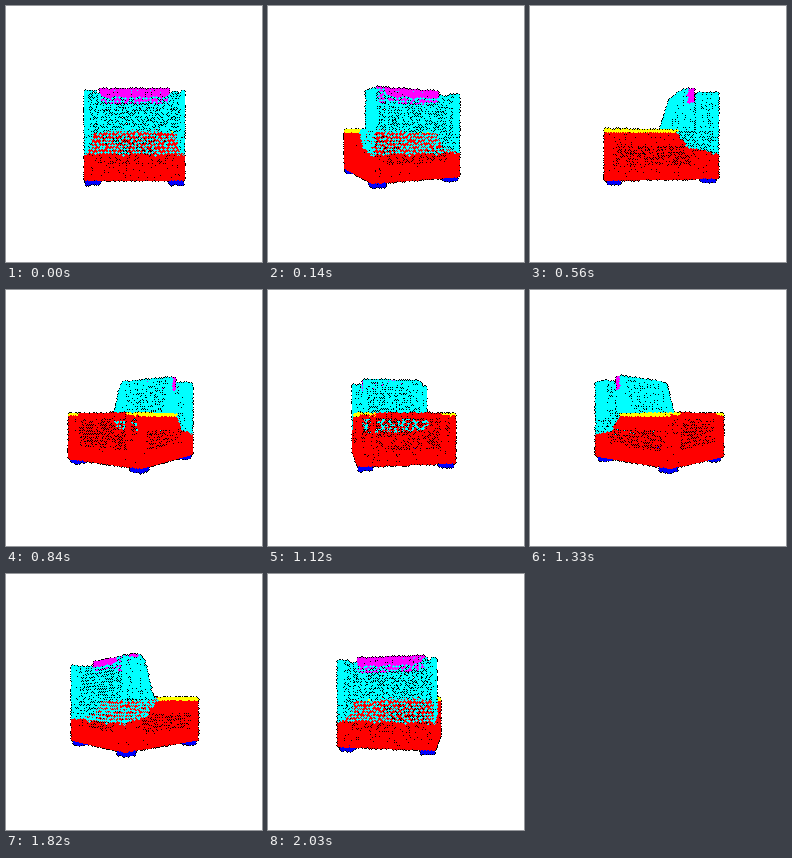
A matplotlib script for the animation above (2100 ms loop, 256x256 px).

```python
import numpy as np
import matplotlib.pyplot as plt
from matplotlib.animation import FuncAnimation

SIZE, FRAMES, INTERVAL = 256, 30, 70
CAM, CX, CY = 260, 128, 126.5          # camera distance and screen centre
W, FRONT, REAR = 40.6, -48.3, 46.6     # half width, depth range
TOP, ARM, BASE, FOOT = 34, 2.5, -38.5, -42.3
HUMP, PEAK = 30, 38.8                  # back cushion half width and height

RED, CYAN, YELLOW, MAGENTA, BLUE, BLACK, WHITE = range(7)
PALETTE = np.array([(255, 0, 0), (0, 255, 255), (255, 255, 0), (255, 0, 255),
                    (0, 0, 255), (0, 0, 0), (255, 255, 255)], np.uint8)

rng = np.random.default_rng(7)
cloud, labels = [], []


def grid(p0, p1, q0, q1, step):
    """Staggered, jittered grid over a rectangle."""
    p = np.linspace(p0, p1, max(2, round(abs(p1 - p0) / step) + 1))
    q = np.linspace(q0, q1, max(2, round(abs(q1 - q0) / step) + 1))
    p, q = np.meshgrid(p, q)
    p[1::2] += step / 2
    p = p.ravel() + rng.uniform(-.25, .25, p.size) * step
    q = q.ravel() + rng.uniform(-.25, .25, q.size) * step
    return np.clip(p, p0, p1), np.clip(q, q0, q1)


def add(x, y, u, color):
    x, y, u, color = np.broadcast_arrays(x, y, u, color)
    cloud.append(np.stack([x, y, u], 1))
    labels.append(color)


def panel(p0, p1, q0, q1, place, sparse=None, dense=1.4, loose=2.8):
    """Sample a flat part, thinner where sparse(p, q) holds."""
    for step, thin in ((dense, False), (loose, True)):
        p, q = grid(p0, p1, q0, q1, step)
        keep = (sparse(p, q) if sparse else np.zeros(p.size, bool)) == thin
        place(p[keep], q[keep])


def side(x):
    def edge(u):
        return np.interp(u, [8, 22, REAR], [ARM, -13, -18.5])

    def sparse(u, y):
        window = (y > -27) & (y < -11) & (u > -40) & (u < 28)
        return window | (y > edge(u))

    def place(u, y):
        color = np.where(y > edge(u), CYAN, RED)
        color[(y > .6) & (u < 12)] = YELLOW
        add(x, y, u, color)

    panel(FRONT, REAR, BASE, ARM, place, sparse, loose=2.6)


def front():
    def sparse(x, y):
        middle = (abs(x) < 27) & (y > -26) & (y < -1.5)
        outer = (abs(x) > 31) & (abs(x) < 38) & (y > -14) & (y < -1.5)
        return middle | outer

    def place(x, y):
        add(x, y, FRONT, np.where((y > 1.2) & (abs(x) > 28), YELLOW, RED))

    panel(-W, W, BASE, ARM, place, sparse)


def rear():
    def sparse(x, y):
        post = (abs(x) > 26) & (abs(x) < 30) | (abs(x) > 38)
        return (y > -18.5) & ((y < 0) | ~post) | (y > -25) & (abs(x) < 28)

    def place(x, y):
        low = (abs(x) > HUMP) | (y < 30.5)
        x, y = x[low], y[low]
        add(x, y, REAR, np.where(y > -18.5, CYAN, RED))

    panel(-W, W, BASE, TOP, place, sparse)


def cushion():
    def lean(y):
        return np.interp(y, [ARM, 36.5, PEAK], [5, 16, 21])

    panel(-HUMP, HUMP, ARM, PEAK, lambda x, y: add(x, y, lean(y), CYAN),
          dense=2.2)
    panel(-HUMP, HUMP, 27, PEAK, lambda x, y: add(x, y, 27, MAGENTA),
          dense=1.6)
    for x in (-HUMP, HUMP):
        def place(u, y):
            inside = u > lean(y)
            u, y = u[inside], y[inside]
            add(x, y, u, np.where((u > 23) & (y > 27), MAGENTA, CYAN))
        panel(5, 28, ARM, PEAK, place, dense=1.7)


def posts():
    for s in (-1, 1):
        panel(31, REAR, ARM, TOP, lambda u, y: add(s * W, y, u, CYAN),
              dense=1.7)
        panel(HUMP, W, ARM, TOP, lambda x, y: add(s * x, y, 31, CYAN),
              dense=2.1)


def feet():
    for sx in (-1, 1):
        for u0 in (FRONT + 2, REAR - 11):
            for x in (30.5, 39.5):
                panel(u0, u0 + 9, FOOT, BASE,
                      lambda u, y: add(sx * x, y, u, BLUE))
            for u in (u0, u0 + 9):
                panel(30.5, 39.5, FOOT, BASE,
                      lambda x, y: add(sx * x, y, u, BLUE))


side(W)
side(-W)
front()
rear()
cushion()
posts()
feet()
panel(-W, W, FRONT, REAR, lambda x, u: add(x, BASE, u, RED), dense=2.3)

X, Y, U = np.concatenate(cloud).T
LABEL = np.concatenate(labels)
DOTS = rng.random((SIZE, SIZE)) < .45
DISC = ((0, 0), (1, 0), (-1, 0), (0, 1), (0, -1))


def render(i):
    t = 2 * np.pi * i / FRAMES
    z = U * np.cos(t) + X * np.sin(t)
    scale = CAM / (CAM - z)
    col = np.rint(CX + scale * (U * np.sin(t) - X * np.cos(t))).astype(int)
    row = np.rint(CY - scale * Y).astype(int)

    depth = np.full((SIZE, SIZE), -1e3)
    for dx, dy in DISC:
        np.maximum.at(depth, (row + dy, col + dx), z)
    color = np.full((SIZE, SIZE), WHITE)
    for dx, dy in DISC:
        r, c = row + dy, col + dx
        top = z >= depth[r, c]
        color[r[top], c[top]] = LABEL[top]

    # dark rims where neighbouring pixels lie clearly closer
    count = np.zeros((SIZE, SIZE), int)
    for axis, shift in ((0, 1), (0, -1), (1, 1), (1, -1)):
        near = np.roll(depth, shift, axis)
        hue = np.roll(color, shift, axis)
        through = (hue == CYAN) & (color == RED)
        count += (near - depth > 9) & ~through
    empty = color == WHITE
    rim = np.where(empty, (count > 1) | (count == 1) & DOTS, count > 2)
    return PALETTE[np.where(rim, BLACK, color)]


fig = plt.figure(figsize=(SIZE / 100, SIZE / 100), dpi=100, facecolor="white")
ax = fig.add_axes([0, 0, 1, 1])
ax.axis("off")
view = ax.imshow(render(0), interpolation="nearest", aspect="auto")


def update(i):
    view.set_data(render(i))
    return [view]


anim = FuncAnimation(fig, update, frames=FRAMES, interval=INTERVAL,
                     repeat=True, repeat_delay=0)
plt.show()
```
